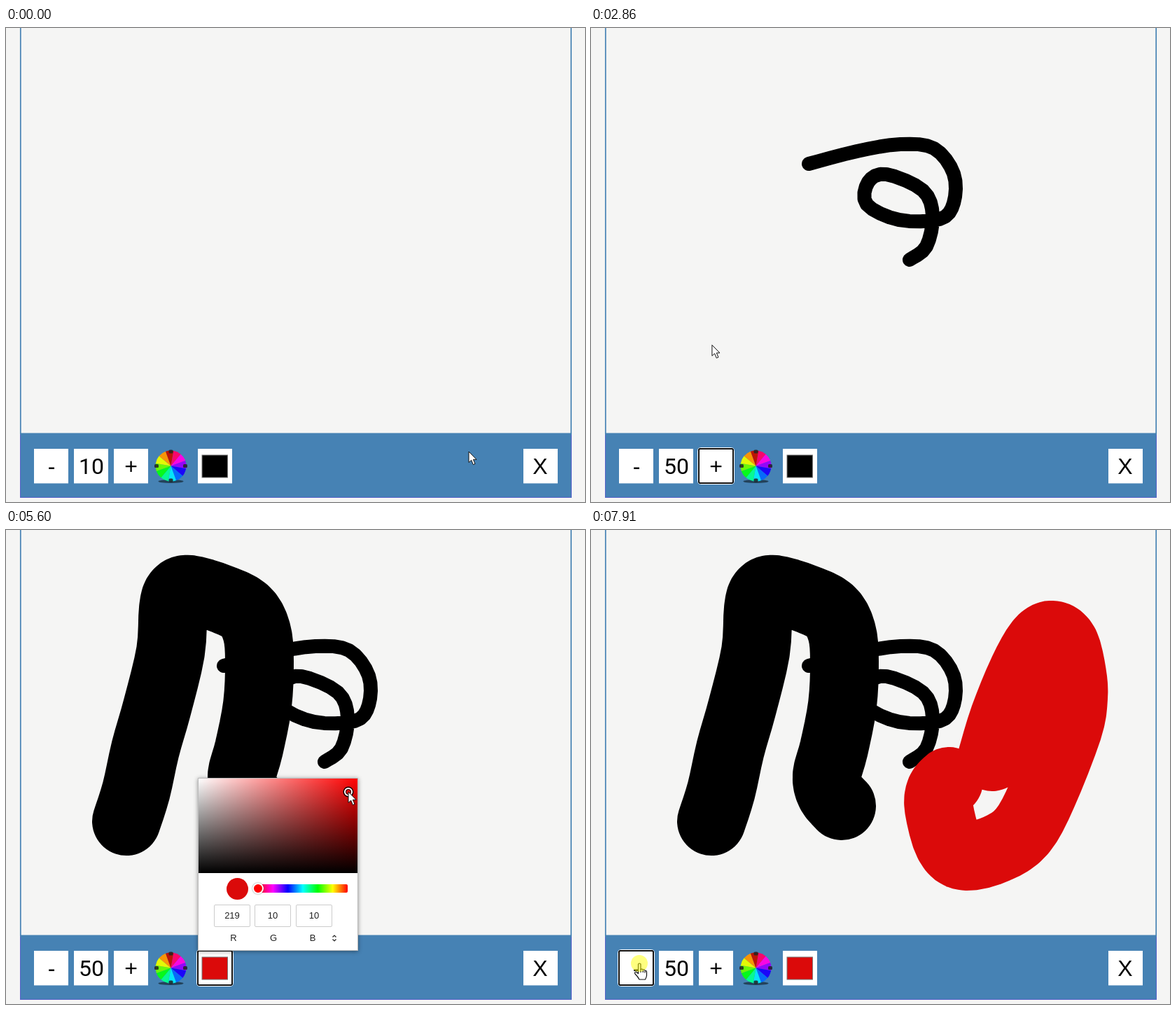
Animation, 827 px wide and 677 px high, one loop 7990 ms. Source, as an HTML page:

```html
<!DOCTYPE html>
<html lang="en">
<head>
<meta charset="utf-8">
<title>Drawing pad</title>
<style>
  html, body { margin: 0; width: 100%; height: 100%; overflow: hidden; background: #f5f5f4; }
  body { position: relative; }
  svg { position: absolute; left: 0; top: 0; display: block; }
  text { font: 32px "Liberation Sans", Arial, sans-serif; text-anchor: middle; }
  #size { font-family: Roboto, sans-serif; }
  .line { fill: none; stroke-linecap: round; stroke-linejoin: round; }
  #popup { position: absolute; left: 274px; top: 354px; width: 229px; height: 247px;
    box-shadow: 0 1px 6px rgba(0,0,0,.42); }
  #tint { position: absolute; left: 0; right: 0; bottom: 0; height: 22px; background: rgba(0,0,0,.08); }
  #panel { position: absolute; inset: 0; background: #fff; border: 1px solid #bbb; box-sizing: border-box;
    font: 13px "Liberation Sans", Arial, sans-serif; color: #222; }
  #panel > * { position: absolute; box-sizing: border-box; }
  #shade { left: 0; top: 0; width: 227px; height: 135px; overflow: hidden;
    background: linear-gradient(to top, #000, transparent), linear-gradient(to right, #fff, #f00); }
  #ring { position: absolute; width: 12px; height: 12px; margin: -6px; box-sizing: border-box;
    border: 2px solid #fff; border-radius: 50%; box-shadow: 0 0 0 1.5px #000, inset 0 0 0 1px #000; }
  #dot { left: 40px; top: 142px; width: 31px; height: 31px; border-radius: 50%; }
  #hue { left: 85px; top: 151px; width: 128px; height: 12px; border-radius: 2px;
    background: linear-gradient(to right, #f00, #f0f, #00f, #0ff, #0f0, #ff0, #f00); }
  #knob { left: 77px; top: 149px; width: 16px; height: 16px; border-radius: 50%;
    background: #f00; border: 2px solid #fff; box-shadow: 0 0 2px rgba(0,0,0,.5); }
  .box { top: 180px; width: 52px; height: 32px; line-height: 30px; border: 1px solid #ccc;
    border-radius: 2px; text-align: center; }
  .tag { top: 220px; width: 20px; line-height: 16px; text-align: center; }
</style>
</head>
<body>
<svg width="827" height="677">
  <rect width="827" height="677" fill="#f5f5f4"/>
  <polyline id="thin" class="line" stroke="#000" stroke-width="20"/>
  <polyline id="thick" class="line" stroke="#000" stroke-width="98"/>
  <polyline id="red" class="line" stroke="#db0a0a" stroke-width="98"/>
  <path d="M20.8 0V580M807.2 0V580" stroke="#4682b4" stroke-width="1.7"/>
  <rect x="20" y="578.5" width="788" height="92.5" fill="#4682b4"/>
  <path d="M20.5 581V670.5H807.5V581" fill="none" stroke="#5560c8"/>
  <g id="buttons" fill="#fff"></g>
  <g id="wheel"></g>
  <rect id="swatch" x="280" y="610" width="36.5" height="32" stroke="#777"/>
  <g id="focus" fill="none">
    <rect x="-1.5" y="-1.5" width="52" height="52" rx="4" stroke="#fff"/>
    <rect width="49" height="49" rx="2" stroke="#101010" stroke-width="2"/>
  </g>
  <text x="65" y="636.5">-</text>
  <text id="size" x="122" y="637">10</text>
  <text x="178.5" y="636.5">+</text>
  <text x="763" y="636.5">X</text>
</svg>

<div id="popup">
  <div id="tint"></div>
  <div id="panel">
    <div id="shade"><div id="ring"></div></div>
    <div id="dot"></div>
    <div id="hue"></div><div id="knob"></div>
    <div class="box" style="left:22px"></div>
    <div class="box" style="left:80px"></div>
    <div class="box" style="left:139px"></div>
    <div class="tag" style="left:40px">R</div>
    <div class="tag" style="left:97px">G</div>
    <div class="tag" style="left:153px">B</div>
    <svg style="left:190px;top:223px" width="8" height="10" fill="none" stroke="#222" stroke-width="1.2">
      <path d="M1.5 3.5L4 1L6.5 3.5M1.5 6.5L4 9L6.5 6.5"/>
    </svg>
  </div>
</div>

<svg width="827" height="677">
  <g id="pointer" stroke="#111" fill="#fff" stroke-linejoin="round">
    <path id="arrow" d="M0 0V15.5L3.7 12.2L6.3 18.6L9 17.5L6.4 11.3H11Z"/>
    <g id="hand" stroke-width="1.2">
      <path d="M-1.5 1Q0 -1 2 1V8.5Q4 7.5 5.3 9Q7 8.3 8 10Q10.5 10 10.5 12.5V17.5Q10 20.5 8.5 23H0Q-2 19 -6 15Q-7.5 12.5 -4.5 12L-1.5 14.5Z"/>
      <path d="M2 8V13M5.3 9.5V13M8 10.5V13.5" fill="none"/>
    </g>
    <circle id="glow" r="12" fill="#ff0" fill-opacity=".5" stroke="none"/>
  </g>
</svg>

<script>
const $ = id => document.getElementById(id);
const LOOP = 7990;
const START = [661, 605];

// Pointer legs: start, end, points as "x,y", and the stroke drawn on the way, if any.
// Each leg eases in and out along its path; a plain leg starts where the last one ended.
const legs = [
  [70, 320, '311,194'],
  [320, 902, '311,194 380,176 442,166 490,172 518,208 518,250 498,273 440,274 394,252 396,220 422,209 474,232 488,268 479,312 455,331', 'thin'],
  [902, 1400, '177,618'],
  [2652, 2930, '172,416'],
  [2930, 3592, '172,416 186,372 199,313 216,253 235,174 239,112 246,90 263,85 304,97 341,115 358,145 362,188 359,250 347,312 337,350 342,375 358,394', 'thick'],
  [3592, 4250, '288,626'],
  [4514, 5360, '489,374'],
  [5846, 6187, '573,324'],
  [6187, 7054, '573,324 590,268 617,202 641,160 660,150 677,164 687,205 689,240 681,285 645,377 616,430 580,455 535,466 511,448 497,398 499,373 511,359', 'red'],
  [7054, 7448, '458,484'],
  [7448, 7790, '69,619']
];

const clicks = { swatch: 4295, pick: 5505, close: 6050, minus: 7820 };
const PRESS = 80;
const plus = { from: 1560, every: 141, times: 8 };
const popup = { open: 4440, ready: 4515 };
const focuses = [[plus.from, 2930, 154], [clicks.swatch, clicks.close, 274], [clicks.minus, LOOP, 40]];

// The picture advances in steps of about 76 ms.
const step = t => {
  const [from, len] = t < 5846 ? [876, 76] : [5846, 76.3];
  return Math.max(0, from + Math.floor((t - from) / len) * len);
};

const ease = u => (1 - Math.cos(Math.PI * Math.min(1, Math.max(0, u)))) / 2;
const mix = (a, b, u) => a.map((v, i) => v + (b[i] - v) * u);
const within = (t, a, b) => t >= a && t < b;

// Catmull-Rom curve through the points, as short straight pieces
function smooth(pts, cuts = 4) {
  const out = [pts[0]];
  for (let i = 0; i < pts.length - 1; i++) {
    const b = pts[i], c = pts[i + 1], a = pts[i - 1] || b, d = pts[i + 2] || c;
    for (let k = 1; k <= cuts; k++) {
      const u = k / cuts;
      out.push(b.map((v, j) => v + u / 2 * (c[j] - a[j]
        + u * (2 * a[j] - 5 * v + 4 * c[j] - d[j] + u * (3 * (v - c[j]) + d[j] - a[j])))));
    }
  }
  return out;
}

// The first part of a polyline, cut at a share of its length
function cut(pts, share) {
  const lens = pts.slice(1).map((p, i) => Math.hypot(p[0] - pts[i][0], p[1] - pts[i][1]));
  let left = share * lens.reduce((a, b) => a + b, 0), i = 0;
  while (i < lens.length - 1 && left > lens[i]) left -= lens[i++];
  return [...pts.slice(0, i + 1), mix(pts[i], pts[i + 1], Math.min(1, left / lens[i]))];
}

let last = START;
const paths = legs.map(([from, to, list, ink]) => {
  const pts = list.split(' ').map(p => p.split(',').map(Number));
  const line = ink ? smooth(pts) : [last, ...pts];
  last = pts[pts.length - 1];
  return { from, to, line, ink };
});

const show = (id, on) => { $(id).style.display = on ? '' : 'none'; };
const boxes = [...document.querySelectorAll('.box')];
const buttons = [40, 97, 154, 274, 739];

function draw(time) {
  const t = step(time);
  let tip = START, drawing = false;
  for (const { from, to, line, ink } of paths) {
    const part = t < from ? [] : cut(line, ease((t - from) / (to - from)));
    if (part.length) tip = part[part.length - 1];
    if (ink) {
      $(ink).setAttribute('points', part.join(' '));
      drawing = drawing || within(t, from, to);
    }
  }
  const [x, y] = tip;

  const hits = Math.floor((t - plus.from) / plus.every) + 1;
  $('size').textContent = 10 + 5 * Math.max(0, Math.min(plus.times, hits));
  const tapping = within(hits, 1, plus.times + 1) && (t - plus.from) % plus.every < PRESS;
  const pressing = Object.values(clicks).some(c => within(t, c, c + PRESS)) || t >= clicks.minus;
  show('glow', drawing || tapping || pressing);

  const focus = focuses.find(([a, b]) => within(t, a, b));
  show('focus', focus);
  if (focus) $('focus').setAttribute('transform', `translate(${focus[2]} 601)`);

  const picked = t >= clicks.pick;
  const rgb = picked ? [219, 10, 10] : [0, 0, 0];
  const color = `rgb(${rgb})`;
  $('swatch').setAttribute('fill', color);
  $('dot').style.background = color;
  $('ring').style.left = (picked ? 214 : 0) + 'px';
  $('ring').style.top = (picked ? 19 : 135) + 'px';
  boxes.forEach((b, i) => { b.textContent = rgb[i]; });
  show('popup', within(t, popup.open, clicks.close));
  show('panel', t >= popup.ready);

  const hover = within(y, 601, 650) && buttons.some(b => within(x, b, b + 49));
  show('hand', hover);
  show('arrow', !hover);
  $('pointer').setAttribute('transform', `translate(${x} ${y})`);
}

$('buttons').innerHTML = buttons
  .map(x => `<rect x="${x}" y="601" width="49" height="49.4"/>`).join('');

// Colour wheel: equal slices, hue falling clockwise from the top
const polar = (deg, r) => {
  const a = deg * Math.PI / 180;
  return [235.5 + r * Math.sin(a), 625.5 - r * Math.cos(a)];
};
let wheel = '<ellipse cx="235.5" cy="647.5" rx="18" ry="2.5" fill="#172c3d" opacity=".75"/>';
for (let a = 10; a < 370; a += 30) {
  const light = a > 330 ? 38 : 50;
  wheel += `<path d="M235.5 625.5L${polar(a, 22)}A22 22 0 0 1 ${polar(a + 30, 22)}Z" fill="hsl(${345 - a} 95% ${light}%)"/>`;
}
for (let a = 0; a < 360; a += 90) {
  const [x, y] = polar(a, 20.5);
  wheel += `<rect x="${x - 3}" y="${y - 2.5}" width="6" height="5" rx="1.5" fill="#222" opacity=".85"/>`;
}
$('wheel').innerHTML = wheel;

const t0 = performance.now();
function tick() {
  draw((performance.now() - t0) % LOOP);
  requestAnimationFrame(tick);
}
tick();
</script>
</body>
</html>
```
